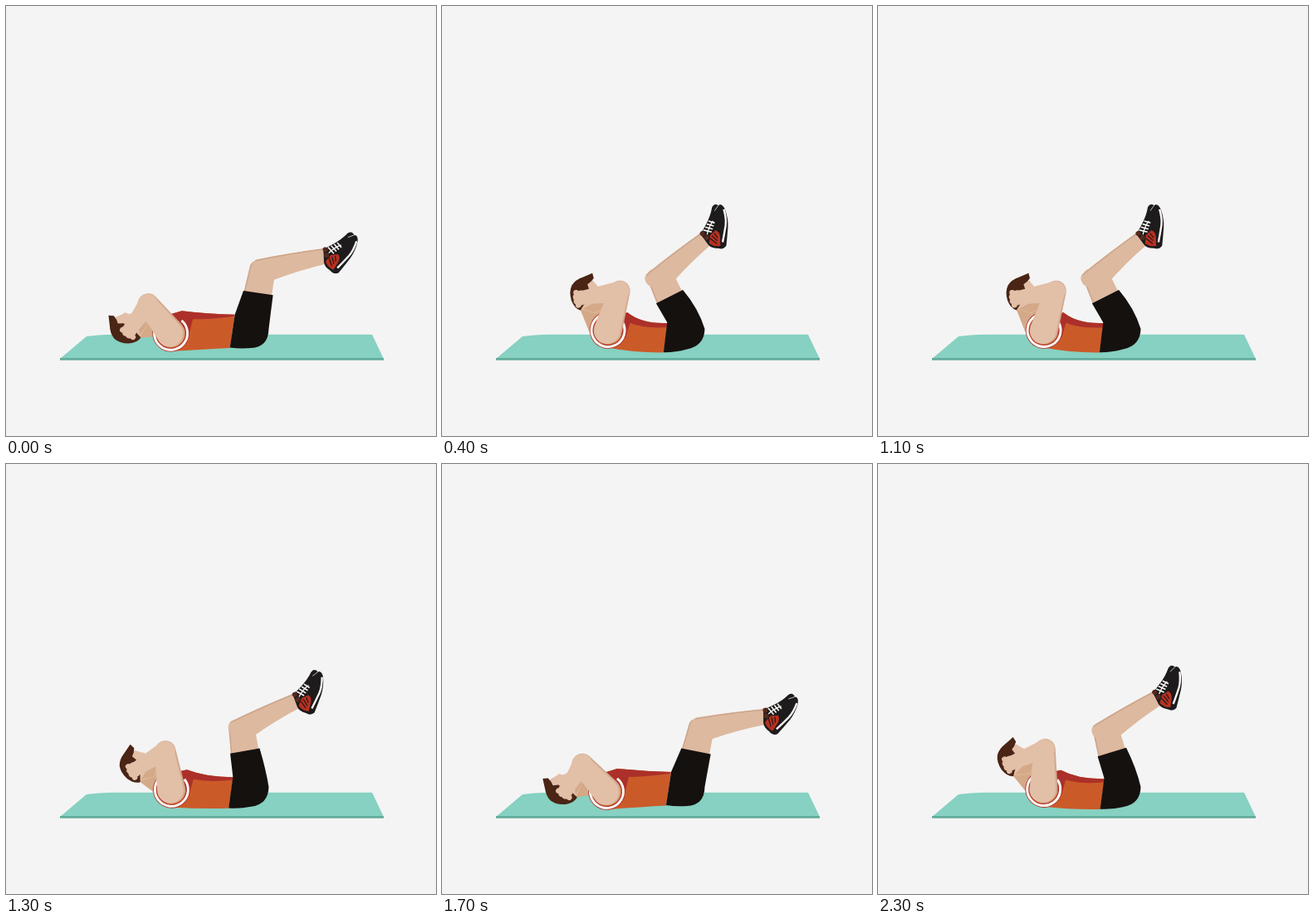
Animation, 518 px wide and 518 px high, one loop 2.4 s. Source, as an HTML page with a canvas:

```html
<!DOCTYPE html>
<html lang="en">
<head>
<meta charset="utf-8">
<title>Crunch exercise</title>
<style>
html, body { margin: 0; width: 100%; height: 100%; overflow: hidden; background: #f4f4f4; }
canvas { display: block; width: 518px; height: 518px; }
</style>
</head>
<body>
<canvas id="stage" width="518" height="518"></canvas>
<script>
const ctx = document.getElementById('stage').getContext('2d');
const LOOP = 2400, STEP = 100, REP = 2000;
const C = {
  bg: '#f4f4f4', mat: '#86d1c1', matEdge: '#62ab9a',
  leg: '#ddb99f', legShade: '#cda78e', arm: '#e2bfa7', armShade: '#d2a98f', neck: '#d4a987',
  hair: '#4a2415', shirt: '#cb5a29', red: '#ac3029',
  black: '#15110f', shoe: '#1d1b1c', shoeRed: '#b8301f', white: '#fbf8f4', ankle: '#54291f'
};

const mix = (a, b, c) => a + (b - a) * c;
const mixPt = (x0, y0, x1, y1, c) => [mix(x0, x1, c), mix(y0, y1, c)];
const polar = (p, deg, len) => turn(p, deg, len, 0);
const ease = u => (1 - Math.cos(Math.PI * Math.min(1, Math.max(0, u)))) / 2;

// 0 lying, 1 curled up: a quick lift, a slower drop, then a rest
function crunch(ms) {
  const t = Math.floor(ms % LOOP / STEP) * STEP % REP;
  return 1.02 * Math.min(ease((t + 110) / 750), ease((1700 - t) / 880));
}

function turn(p, deg, x, y) {
  const a = deg * Math.PI / 180, k = Math.cos(a), s = Math.sin(a);
  return [p[0] + x * k - y * s, p[1] + x * s + y * k];
}
function place(p, deg, draw) {
  ctx.save();
  ctx.translate(...p);
  ctx.rotate(deg * Math.PI / 180);
  draw();
  ctx.restore();
}

function fill(color) { ctx.fillStyle = color; ctx.fill(); }
function stroke(color, width) { ctx.strokeStyle = color; ctx.lineWidth = width; ctx.stroke(); }

// Each entry: [x, y] is a line, [cx, cy, x, y] a curve
function path(pts) {
  ctx.beginPath();
  pts.forEach((p, i) => {
    if (!i) ctx.moveTo(...p);
    else if (p.length === 2) ctx.lineTo(...p);
    else ctx.quadraticCurveTo(...p);
  });
}
function shape(color, pts) { path(pts); ctx.closePath(); fill(color); }
function line(color, width, pts) { path(pts); stroke(color, width); }
function dot(color, x, y, r) {
  ctx.beginPath();
  ctx.arc(x, y, r, 0, 7);
  fill(color);
}

// Tapered capsule from p (radius r) to q (radius s)
function limb(color, p, r, q, s) {
  const a = Math.atan2(q[1] - p[1], q[0] - p[0]);
  const b = Math.acos((r - s) / Math.hypot(q[0] - p[0], q[1] - p[1]));
  ctx.beginPath();
  ctx.arc(...p, r, a + b, a - b + 2 * Math.PI);
  ctx.arc(...q, s, a - b, a + b);
  ctx.closePath();
  fill(color);
}

function drawMat() {
  shape(C.mat, [[97, 398], [110, 396, 130, 395.7], [441, 395.7], [455, 425], [65, 425]]);
  shape(C.matEdge, [[65, 424], [455, 424], [455, 426.7], [65, 426.7]]);
}

// Origin at the ankle, toes towards +x, sole towards +y
function drawShoe() {
  shape(C.shoe, [[-2, -9], [10, -12], [22, -15, 31, -21], [37, -23, 38, -17],
    [43, -16, 40, -8], [35, 2, 27, 9], [17, 17, 9, 23], [3, 24, 0, 18], [-6, 12, -5, 6]]);
  shape(C.shoeRed, [[-3, 6], [5, 0], [14, 1], [16, 7, 10, 12], [4, 18], [-2, 14, -3, 6]]);
  line(C.white, 2.4, [[39, -9], [33, 1, 26, 6], [17, 12, 9, 17]]);
  for (let i = 0; i < 3; i++) {
    line(C.shoe, 1.2, [[2 + i * 4, 2], [3 + i * 3, 13 - i * 2]]);
  }
  for (let i = 0; i < 4; i++) {
    line(C.white, 1.6, [[4 + i * 4, -10 - i], [9 + i * 3.5, -1 - i * 1.6]]);
  }
  line(C.white, 1.3, [[3, -3], [11, -8, 20, -9]]);
  line(C.bg, .7, [[30, -16], [38, -17]]);
  dot(C.ankle, 0, -8, 3);
  dot(C.ankle, 0, -1, 3);
}

function drawLegs(c) {
  const hip = [296, 395], thigh = 11 - 48 * c;
  const knee = turn(hip, thigh, mix(1.7, -6.7, c), mix(-77, -72, c));
  place(hip, thigh, () => {
    shape(C.leg, [[-17, -46], [-14, -80], [-13, -88, -5, -89], [6, -88], [17, -68], [17, -46]]);
    line(C.legShade, 1.6, [[-16, -48], [-13.3, -80], [-12, -87, -5, -88]]);
  });
  place(knee, -11 - 38 * c, () => {
    shape(C.leg, [[-11, -4], [-11, -14, -3, -15], [36, -14, 82, -9.5], [79, 9],
      [44, 9, 12, 13.5], [-4, 14]]);
    line(C.legShade, 1.6, [[-5, -14], [36, -13, 81, -8.7]]);
    place([80, 0], -8 * c, drawShoe);
  });
  const left = turn(hip, thigh, -17.5, -50), right = turn(hip, thigh, 18.5, -50);
  shape(C.black, [left, mixPt(276, 371, 270, 384, c), mixPt(270, 411, 266, 419, c),
    [...mixPt(283, 413, 279, 419, c), 295, mix(412, 414, c)],
    [316, mix(411, 409, c), 316.5, 389],
    [...mixPt(319, 375, 306, 361, c), ...right]]);
}

function drawTorso(c, shoulder) {
  const strap = mixPt(195, 372, 191, 376, c), chest = mixPt(211, 367, 227, 370, c);
  const dip = mixPt(243, 370, 240, 387, c), waist = mixPt(276, 371, 271, 385, c);
  shape(C.shirt, [strap, chest, [...dip, ...waist], mixPt(270, 411.5, 266, 419, c),
    [...mixPt(240, 413, 228, 419, c), ...mixPt(202, 416, 203, 411, c)],
    [...mixPt(180, 413, 184, 407, c), ...mixPt(177, 398, 179, 388, c)],
    [...mixPt(179, 384, 181, 380, c), ...strap]]);
  shape(C.red, [strap, chest, [...dip, ...waist], mixPt(274, 373, 270, 391, c),
    [...mixPt(243, 377, 243, 392, c), ...mixPt(225, 377, 227, 383, c)],
    mixPt(221, 393, 221, 402, c), mixPt(205, 380, 205, 385, c)]);
  ctx.beginPath();
  ctx.arc(...shoulder, 20, -.9 + .5 * c, 3.6 + .8 * c);
  stroke(C.red, 4.6);
  stroke(C.white, 3);
}

function drawHead(c, hand) {
  const at = [hand[0] + 2 * c, hand[1] + 3 * (1 - c)];
  const deg = -98 + 98 * c + 16 * c * (1 - c);
  shape(C.neck, [turn(at, deg, -7, 8), turn(at, deg, 20, 15),
    mixPt(196, 378, 206, 376, c), mixPt(179, 399, 177, 391, c)]);
  place(at, deg, () => {
    shape(C.arm, [[-6, -14], [12, -20], [19, -16], [22, -8], [24, -5], [22, 0],
      [25, 10], [25, 17, 18, 20], [9, 22], [-6, 12]]);
    shape(C.neck, [[9, 10], [24, 14], [23, 18, 17, 20], [8, 21], [-4, 12]]);
    shape(C.hair, [[21, -25], [20.5, -18.5], [16, -15, 11, -14], [11, -7], [7, -4], [4, 4], [-7, 13],
      [-13, 9, -13.5, -2], [-13, -13, -7, -19], [-1, -24, 9, -24]]);
  });
}

function drawArm(shoulder, elbow, hand, bend) {
  const lit = p => [p[0] - 1.3, p[1] + .5];
  limb(C.armShade, shoulder, 16.8, elbow, 12.4);
  limb(C.arm, lit(shoulder), 15.8, lit(elbow), 11.8);
  limb(C.arm, elbow, 11.6, hand, 8);
  place(hand, bend, () => {
    for (let i = 0; i < 4; i++) dot(C.arm, 7 - Math.abs(i - 1.5) * 1.4, -8 + i * 5, 3.4);
    dot(C.arm, 0, 0, 9);
  });
}

function draw(c) {
  ctx.fillStyle = C.bg;
  ctx.fillRect(0, 0, 518, 518);
  drawMat();
  const shoulder = mixPt(198.5, 394.5, 200.5, 389.5, c), bend = 122 + 61 * c;
  const elbow = polar(shoulder, -131.3 + 74 * c, mix(44.5, 51, c));
  const hand = polar(elbow, bend, mix(38, 50, c));
  drawHead(c, hand);
  drawTorso(c, shoulder);
  drawLegs(c);
  drawArm(shoulder, elbow, hand, bend);
}

const start = performance.now();
function tick() {
  draw(crunch(performance.now() - start));
  requestAnimationFrame(tick);
}
tick();
</script>
</body>
</html>
```
